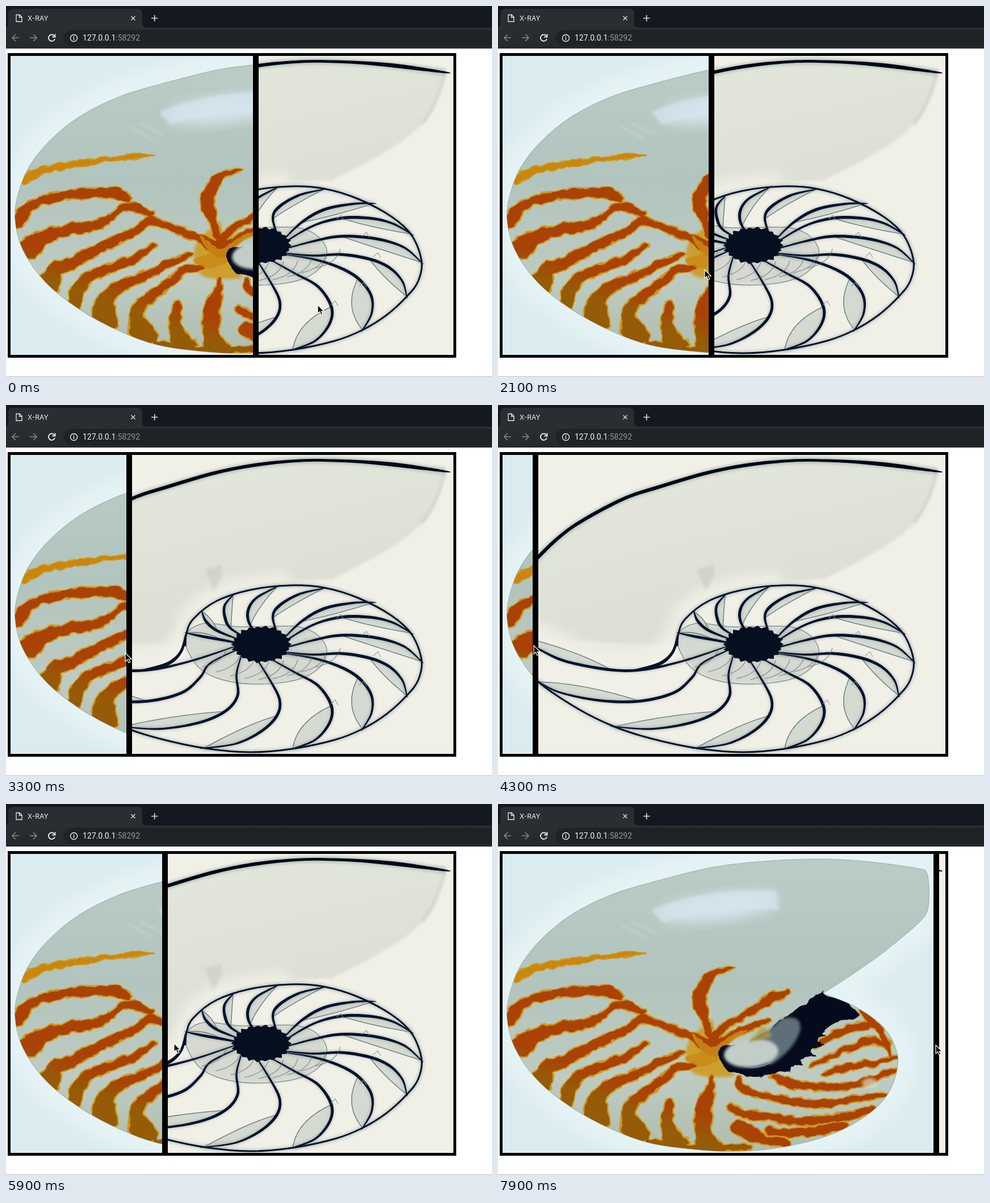
An HTML page for the animation above (8 s loop, 856 px wide and 654 px high).

```html
<!DOCTYPE html>
<html lang="en">
<head>
<meta charset="utf-8">
<title>X-RAY</title>
<style>
  html, body { margin: 0; width: 856px; height: 654px; overflow: hidden; background: #fff; }
  body { position: relative; }
  svg { display: block; }
  #chrome, #cursor { position: absolute; left: 0; top: 0; }
  #cursor { overflow: visible; }
  #page { position: absolute; left: 0; bottom: 0; width: 856px; height: 1px; background: #b9b9b9; }
  #viewer { position: absolute; left: 3px; top: 83px; width: 780px; height: 527px; border: 5px solid #000; overflow: hidden; }
  #cover { position: absolute; left: 0; top: 0; height: 527px; overflow: hidden; }
  #bar { position: absolute; left: 0; top: 0; width: 10px; height: 527px; background: #000; }
  .tab { font: 12px Inter, sans-serif; fill: #f1f3f4; }
  .url { font: 14px Roboto, sans-serif; fill: #f1f3f4; }
</style>
</head>
<body>
<svg id="chrome" width="856" height="75" fill="none">
  <defs>
    <linearGradient id="tools" x2="0" y2="1"><stop stop-color="#2a2d31"/><stop offset="1" stop-color="#25292c"/></linearGradient>
  </defs>
  <path fill="#141820" d="M0 0H856V40H0Z"/>
  <path fill="url(#tools)" d="M0 38H856V75H0Z"/>
  <path fill="#2a2d31" d="M0 38Q4 36 4 30V13Q4 5 12 5H232Q240 5 240 13V30Q240 38 248 38Z"/>
  <path fill="#1f2326" d="M116 42H856V71H116A14.5 14.5 0 0 1 116 42Z"/>
  <path stroke="#e8eaed" stroke-width="1.3" d="M18 15.5H24L28 19.5V27.5H18ZM23.5 15.5V20H28"/>
  <path stroke="#d5d8da" stroke-width="1.5" d="M220.500 18L227.500 25M227.500 18L220.500 25"/>
  <path stroke="#d5d8da" stroke-width="1.7" d="M256 21.500H267.500M261.700 16V27"/>
  <path stroke="#7e898c" stroke-width="1.6" d="M23 56H11M17 50L11 56L17 62M42 56H54M48 50L54 56L48 62"/>
  <path stroke="#f1f3f4" stroke-width="1.8" d="M85 52.500A5.700 5.700 0 1 0 86 58M86.500 49.500V54.500H81.500"/>
  <circle cx="119.500" cy="56.500" r="6" stroke="#e8eaed" stroke-width="1.4"/>
  <path stroke="#e8eaed" stroke-width="1.5" d="M119.500 55.500V60M119.500 53V54.500"/>
  <text class="tab" x="38" y="25.500">X-RAY</text>
  <text class="url" x="135" y="61">127.0.0.1<tspan fill="#8d9999">:58292</tspan></text>
</svg>
<div id="page"></div>
<div id="viewer">
  <svg id="xray" width="780" height="527" viewBox="8 88 780 527">
    <defs>
      <filter id="soft" x="-30%" y="-30%" width="160%" height="160%"><feGaussianBlur stdDeviation="12"/></filter>
      <filter id="haze" x="-20%" y="-20%" width="140%" height="140%"><feGaussianBlur stdDeviation="2.500"/></filter>
      <filter id="hint"><feGaussianBlur stdDeviation=".5"/></filter>
      <linearGradient id="flap" x1=".3" x2=".8" y2="1"><stop stop-color="#e4e6dc"/><stop offset=".7" stop-color="#dcdfd4"/><stop offset="1" stop-color="#e3e5da"/></linearGradient>
    </defs>
  </svg>
  <div id="cover">
    <svg id="shell" width="780" height="527" viewBox="8 88 780 527">
      <defs>
        <filter id="rough" x="-5%" y="-5%" width="110%" height="110%" color-interpolation-filters="sRGB">
          <feTurbulence type="fractalNoise" baseFrequency=".055" numOctaves="2" seed="4"/>
          <feDisplacementMap in="SourceGraphic" scale="11" xChannelSelector="R" yChannelSelector="G"/>
          <feGaussianBlur stdDeviation=".7"/>
        </filter>
        <linearGradient id="body" x2="0" y2="1"><stop stop-color="#b9cdc6"/><stop offset=".4" stop-color="#b1c4bd"/><stop offset=".75" stop-color="#becbc1"/><stop offset="1" stop-color="#aebdb0"/></linearGradient>
        <linearGradient id="rust" gradientUnits="userSpaceOnUse" x1="-139" y1="358" x2="-153" y2="395"><stop stop-color="#aa4206"/><stop offset="1" stop-color="#955b06"/></linearGradient>
      </defs>
    </svg>
  </div>
  <div id="bar"></div>
</div>
<svg id="cursor" width="14" height="20"><path fill="#000" stroke="#fff" stroke-width="1.200" d="M0 0V15L3.500 11.800L6 17.500L8.700 16.300L6.200 11H11Z"/></svg>
<script>
const $ = id => document.getElementById(id);
const nums = s => s.split(' ').map(p => p.split(',').map(Number));
const at = p => p[0].toFixed(1) + ' ' + p[1].toFixed(1);

// Smooth path through points
function spline(pts, closed) {
  const n = pts.length;
  const get = i => closed ? pts[(i + n) % n] : pts[Math.max(0, Math.min(n - 1, i))];
  let d = 'M' + at(pts[0]);
  for (let i = 0; i < (closed ? n : n - 1); i++) {
    const [a, b, c, e] = [get(i - 1), get(i), get(i + 1), get(i + 2)];
    d += 'C' + at([0, 1].map(k => b[k] + (c[k] - a[k]) / 6)) + ' '
       + at([0, 1].map(k => c[k] - (e[k] - b[k]) / 6)) + ' ' + at(c);
  }
  return d;
}

// Ribbon along x,y,width points
function band(pts) {
  const left = [], right = [];
  pts.forEach(([x, y, w], i) => {
    const a = pts[Math.max(0, i - 1)], b = pts[Math.min(pts.length - 1, i + 1)];
    const dx = b[0] - a[0], dy = b[1] - a[1], k = w / 2 / Math.hypot(dx, dy);
    left.push([x - dy * k, y + dx * k]);
    right.unshift([x + dy * k, y - dx * k]);
  });
  return spline(left.concat(right), true);
}
const path = (d, attrs) => `<path d="${d}" ${attrs}/>`;
const oval = (x, y, rx, ry, attrs) => `<ellipse cx="${x}" cy="${y}" rx="${rx}" ry="${ry}" ${attrs}/>`;

function drawXray() {
  const ink = '#07132a';
  const top = nums('16,375,2 22,340,4 40,305,5 71,268,6 110,231,6 150,203,6 222,165,6 285,144,6 371,119,6 445,105,6 520,98,5 580,98,5 640,101,6 700,107,7 774,117,3');
  const side = nums('774,117 774,117 764,150 750,182 733,208 700,237 650,268 575,307 575,307');
  const inner = nums('500,312 400,328 332,365 306,420 250,455 170,450 75,405 40,400');
  const rim = nums('316,425 318,402 330,377 370,346 430,326 500,318 560,322 620,340 680,372 715,405 732,450 726,485 706,512 670,545 628,571 580,590 505,606 430,612 350,605 270,588 205,567 140,535 71,488 45,455 25,410');
  const septa = [
    ['25,405 71,430 120,452 200,467 260,466 330,450 405,425', 130, 428],
    ['71,488 110,507 180,521 250,522 310,507 342,480 360,455 410,430', 150, 490],
    ['205,567 270,571 340,560 386,540 408,512 406,475 415,440', 295, 546],
    ['348,605 405,597 450,575 477,548 482,520 465,485 440,445', 430, 560],
    ['505,606 545,590 570,560 573,530 550,495 510,472 465,447', 512, 558],
    ['628,571 644,542 643,510 620,480 585,460 540,446 490,438', 594, 530],
    ['706,512 698,485 675,461 640,446 590,438 540,440 485,435', 665, 480],
    ['732,452 700,425 650,410 590,406 540,415 485,430', 650, 426],
    ['714,402 680,383 640,374 590,374 540,388 485,420', 640, 390],
    ['648,348 610,349 560,359 520,382 485,416', 586, 368],
    ['560,323 515,334 480,355 470,375 480,408', 506, 350],
    ['478,320 440,341 426,364 430,388 450,410', 445, 354],
    ['400,335 385,354 386,376 396,394 425,412', 398, 358],
    ['345,364 352,381 372,398 415,415', 364, 376],
    ['318,402 346,408 380,414 420,422', 350, 397]
  ];
  const ring = spline(nums('470,390 515,391 548,405 565,432 552,463 510,485 440,492 380,484 340,463 317,425 318,402 350,385 410,391'), true);

  let s = '<path fill="#f1f0e7" d="M8 88H788V615H8Z"/>';
  s += path(spline(top.concat(side, inner), true), 'fill="url(#flap)" filter="url(#haze)"');
  s += path(spline(inner), 'fill="none" stroke="#f1f0e7" stroke-width="36" filter="url(#soft)"');
  s += path(spline(side.slice(1, 5)), 'fill="none" stroke="#b6c0b9" stroke-width="4" opacity=".6" filter="url(#haze)"');
  s += path('M350 290L380 282V302L366 328Z', 'fill="#c7cbc0" opacity=".6" filter="url(#haze)"');
  s += path(spline(top), 'fill="none" stroke="#9fb0b0" stroke-width="11" filter="url(#haze)" opacity=".7"');
  s += path(band(top), `fill="#030914"`);
  s += path(spline(rim), 'fill="#f2f1e8" stroke="#a3b3b2" stroke-width="8" opacity=".6" filter="url(#haze)"');
  s += path(ring, 'fill="#ccd2c9" opacity=".75" filter="url(#haze)"') + path(ring, `fill="none" stroke="#3c4d59" stroke-width="1.5" opacity=".55"`);
  for (const [line, x, y] of septa) {
    const pts = nums(line), last = pts.length - 1;
    const rib = pts.map((p, i) => [...p, 1.6 + 3.6 * Math.sin(Math.PI * i / last)]);
    const part = pts.slice(0, Math.min(4, last));
    s += path(`${spline(part)}Q${x} ${y} ${at(pts[0])}Z`, 'fill="#d5dad1" stroke="#73858a" stroke-width="1.6" filter="url(#hint)"');
    s += path(spline(pts), 'fill="none" stroke="#70858b" stroke-width="7" opacity=".4" filter="url(#haze)"');
    s += path(band(rib), `fill="${ink}" filter="url(#hint)"`);
  }
  s += path(band(nums('240,468,3 285,456,6 308,435,5 317,405,3')), `fill="${ink}"`);
  s += path(spline(rim), `fill="none" stroke="${ink}" stroke-width="3"`);
  // Faint folds inside the inner whorl
  for (let i = 0; i < 9; i++) {
    const x = 345 + i * 25, y = 462 + 22 * Math.sin(i / 8 * Math.PI);
    s += path(`M${x} ${y}Q${x + 38} ${y - 8} ${x + 44} ${y - 34}`, 'fill="none" stroke="#53666f" stroke-width="1.6" opacity=".5"');
  }
  for (const [x, y] of nums('590,374 635,404 655,440 580,525 630,492'))
    s += path(`M${x - 8} ${y + 2}L${x} ${y - 5}L${x + 5} ${y + 4}`, 'fill="none" stroke="#87979a" stroke-width="1.5" opacity=".7"');
  // Ragged core
  const core = Array.from({ length: 44 }, (_, i) => {
    const a = i / 22 * Math.PI, r = 1 + (i % 2 ? -.05 : .06 + .04 * Math.sin(i * 2.3));
    return [450 + 50 * r * Math.cos(a), 422 + 31 * r * Math.sin(a)];
  });
  s += `<polygon points="${core.map(at).join(' ')}" fill="#050f20"/>`;
  $('xray').insertAdjacentHTML('beforeend', s);
}

function drawShell() {
  const outline = spline(nums('16,375 22,330 40,285 75,240 130,195 200,160 275,137 371,113 435,104 500,99 560,97 620,99 680,105 740,114 755,121 759,150 757,185 745,205 715,232 670,268 620,303 572,334 572,334 630,358 680,395 703,440 700,480 680,520 640,555 580,585 500,605 430,612 360,610 270,598 200,573 130,535 70,487 30,430'), true);
  const stripes = [
    '17,388,14 28,370,22 45,351,15 90,337,16 130,330,15 180,328,16 205,333,18 218,342,8',
    '34,438,30 48,422,34 70,406,24 100,396,20 150,388,18 180,376,12 208,354,13 235,358,14 256,370,10',
    '72,506,16 78,486,36 90,463,24 115,453,22 150,434,18 190,414,14 225,399,14 250,380,12 275,385,11 310,397,11 345,412,14 378,434,20',
    '122,536,18 122,513,22 130,493,20 152,475,16 190,460,14 225,447,14 245,431,12 262,420,5',
    '176,566,38 173,540,40 178,515,28 200,495,20 240,478,15 285,455,13 326,438,6',
    '246,596,42 238,568,38 230,540,22 250,516,18 285,490,14 310,468,12 345,458,7',
    '318,608,46 305,586,30 298,560,20 299,540,18 304,522,8',
    '372,611,46 364,585,28 361,555,30 368,520,22 375,495,11 375,480,5',
    '265,594,8 310,603,12 370,608,9 440,605,10',
    '412,289,3 376,302,13 357,330,20 355,355,22 365,380,14 372,410,8',
    '510,332,10 480,343,14 450,362,11 420,380,12 390,400,13 374,425,18',
    '476,382,8 440,395,12 405,412,12 382,438,20',
    '423,485,11 432,503,14 470,514,10 520,525,13 570,529,14 610,523,11 684,513,7',
    '484,481,8 515,492,14 550,498,14 600,499,11 645,490,12 696,470,6',
    '408,534,12 435,546,13 480,552,14 520,558,13 570,556,14 630,548,12 662,535,8',
    '416,565,18 436,576,28 465,590,16 510,598,12',
    '475,576,10 510,580,14 560,576,17 610,566,10',
    '552,462,5 582,447,10 615,432,10 650,418,12 685,424,9',
    '575,477,6 615,464,12 655,458,10 702,445,6',
    '560,427,5 595,406,12 630,393,15 655,390,10',
    '640,364,6 658,383,14 680,407,11 690,440,6'
  ];
  const gold = '#cf9818';
  let s = `<clipPath id="inside"><path d="${outline}"/></clipPath><path fill="#dbecf0" d="M8 88H788V615H8Z"/>`;
  s += path(outline, 'fill="none" stroke="#e5f3f5" stroke-width="60" filter="url(#soft)"');
  s += path(outline, 'fill="url(#body)" stroke="#a7b9b7" stroke-width="1.5" filter="url(#hint)"');
  s += '<g clip-path="url(#inside)">';
  s += oval(390, 182, 105, 22, 'fill="#d7e6ef" transform="rotate(-7 390 182)" filter="url(#soft)"');
  s += path('M270 187Q360 148 490 152L494 187Q390 174 290 209Z', 'fill="#d4e4ec" opacity=".75" filter="url(#haze)"');
  s += path('M215 211L258 236M235 207L278 227', 'stroke="#cbdbdc" stroke-width="4" opacity=".5" filter="url(#haze)"');
  s += path(band(nums('375,385,8 355,430,45 360,455,50 410,475,12')), `fill="${gold}" opacity=".85" filter="url(#haze)"`);
  s += '<g filter="url(#rough)">';
  s += path(band(nums('28,307,16 70,289,13 120,279,11 180,270,9 220,266,8 259,264,3')), `fill="#ca860e" stroke="${gold}" stroke-width="2"`);
  const bands = stripes.map(t => band(nums(t))).join('');
  s += path(bands, `fill="none" stroke="${gold}" stroke-width="5"`) + path(bands, 'fill="url(#rust)"');
  s += path(spline(nums('340,405 380,427 410,408 440,399 400,428 390,450 360,462 330,447 358,436'), true), 'fill="#cb8a16" opacity=".85"');
  s += path(spline(nums('572,334 572,334 605,345 637,372 620,379 602,382 570,404 557,430 530,454 490,474 455,481 420,475 395,459 388,438 400,426 440,420 490,388 525,361'), true), 'fill="#050b1c"');
  s += path('M560 403L580 407L556 416L577 424L548 433L559 445L535 446L538 461L515 458L514 473L491 466Z', 'fill="#050b1c"');
  s += '</g>';
  s += path('M445 425L500 378Q537 370 532 400Q520 435 480 460Z', 'fill="#75898f" opacity=".8" filter="url(#haze)"');
  s += oval(446, 439, 48, 25, 'fill="#c3cdc8" transform="rotate(-6 446 439)" filter="url(#haze)"');
  s += path('M440 420L465 393Q485 398 480 412Z', 'fill="#af9b45" opacity=".8" filter="url(#haze)"');
  s += path('M430 462Q455 469 480 456', 'fill="none" stroke="#82a5cc" stroke-width="2" opacity=".7"');
  s += oval(655, 492, 14, 9, 'fill="#dbe2d9" opacity=".65" filter="url(#haze)"');
  $('shell').insertAdjacentHTML('beforeend', s + '</g>');
}

// time, position
const barKeys = nums('0,435 1800,435 1900,424 2000,398 2100,371 2700,296 3300,212 3600,154 4300,61 4500,34 4700,30 4900,30 5100,42 5400,110 5800,240 5900,275 6600,642 6700,685 6800,714 7000,742 7300,758 7600,765 7900,767');
const pointer = nums('0,549,527 100,523,517 200,523,517 300,485,500 400,456,487 500,456,487 800,442,479 1000,442,479 1300,431,469 1800,431,469 2100,364,465 2700,291,450 3300,210,437 3600,153,431 4300,63,424 4500,38,423 4900,36,422 5100,49,422 5400,122,422 5800,259,422 5900,296,422 6600,655,434 6700,697,433 6800,724,432 7000,750,429 7300,764,427 7600,769,425 7900,771,425');
function sample(keys, t, k) {
  const i = keys.findIndex(p => p[0] > t);
  if (i < 0) return keys[keys.length - 1][k];
  const a = keys[i - 1], b = keys[i];
  return a[k] + (b[k] - a[k]) * (t - a[0]) / (b[0] - a[0]);
}

function tick(now) {
  const t = Math.floor(now % 8000 / 100) * 100;
  const x = Math.round(sample(barKeys, t, 1)) - 8;
  $('bar').style.transform = `translateX(${x}px)`;
  $('cover').style.width = x + 5 + 'px';
  $('cursor').style.transform = `translate(${sample(pointer, t, 1)}px, ${sample(pointer, t, 2)}px)`;
  requestAnimationFrame(tick);
}
drawXray();
drawShell();
tick(performance.now());
</script>
</body>
</html>
```
